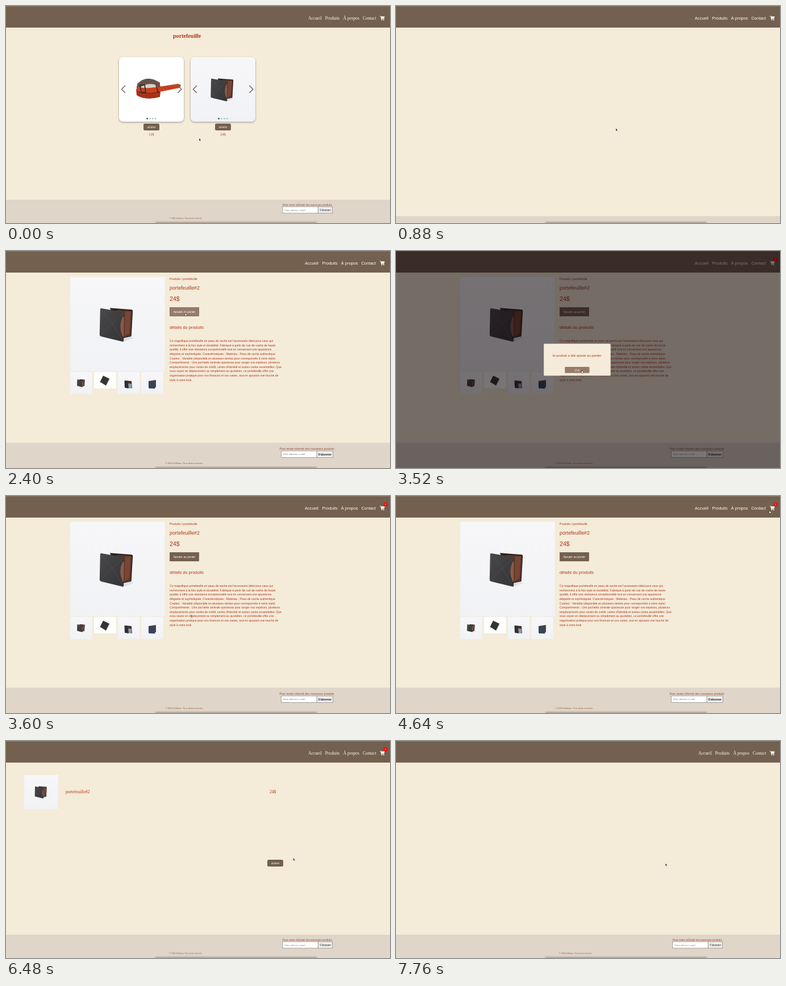
Recreate the animation shown at these times as an HTML page. Size 676 by 382 pixels, loop 8000 ms.

```html
<!DOCTYPE html>
<html lang="fr">
<head>
<meta charset="utf-8">
<title>Boutique</title>
<style>
html, body { margin: 0; width: 100%; height: 100%; overflow: hidden; background: #f4ebd9; }
svg { display: block; width: 676px; height: 382px; }
text { fill: #b0381b; white-space: pre; }
.serif { font-family: "Liberation Serif", "Times New Roman", serif; }
.sans { font-family: "Liberation Sans", Arial, sans-serif; }
</style>
</head>
<body>
<svg id="stage" viewBox="0 0 676 382" xmlns="http://www.w3.org/2000/svg">
  <defs>
    <filter id="soft" x="-20%" y="-20%" width="140%" height="150%"><feDropShadow dx="0" dy="1.2" stdDeviation="1.5" flood-opacity=".4"/></filter>
    <filter id="blur" x="-5%" y="-200%" width="110%" height="500%"><feGaussianBlur stdDeviation="1.8"/></filter>
    <linearGradient id="paper" x2="0" y2="1"><stop stop-color="#f7f7f9"/><stop offset="1" stop-color="#f1f2f5"/></linearGradient>
    <linearGradient id="leather" x2="1" y2="1"><stop stop-color="#48484b"/><stop offset="1" stop-color="#343436"/></linearGradient>
    <g id="wallet">
      <path d="M56 106 93 115 112 108 100 103Z" fill="#dfe0e4"/>
      <path d="M70 55 109 58Q111 59 110.500 61L108 105 94 108Z" fill="#2e2321"/>
      <path d="M82 58.500 109 60 106.500 104 93 107Z" fill="#5e3528"/>
      <path d="M97 61 107 61.500 104.500 99 96 105Z" fill="#774634"/>
      <path d="M54 55.500 92 62Q95.500 63 95.500 66L94.500 112Q94.500 115 91.500 114L54 105Q52 104 52 102L53 57Z" fill="url(#leather)"/>
      <path d="M55 58 74 82 92 66M55 102 74 82 91 109" fill="none" stroke="#56565a" stroke-width=".6"/>
      <path d="M92 72Q85 88 92 104L94.500 106 95 70Z" fill="#8a5a45"/>
    </g>
    <g id="belt">
      <ellipse cx="251" cy="144" rx="21" ry="16" fill="#4b3931"/>
      <ellipse cx="252" cy="143" rx="15" ry="9" fill="#d8d0ca"/>
      <path d="M231 137Q249 121 271 135L271 142Q250 131 233 146Z" fill="#65534a"/>
      <path d="M229 146Q240 156 272 150L271 160Q246 167 230 157Z" fill="#a83118"/>
      <path d="M230 141Q238 147 270 142L303 137 308 139 306 144 271 151Q241 156 230 150Z" fill="#c6421f"/>
      <path d="M230 150Q245 157 271 151" fill="none" stroke="#742110"/>
      <path d="M236 139h8l2 13h-8Z" fill="none" stroke="#3c302c" stroke-width="1.8"/>
      <path d="M264 138l4 15" stroke="#75200e" stroke-width="2"/>
      <path d="M279 144h17" stroke="#7a220f" stroke-width="1" stroke-dasharray="1 3"/>
    </g>
    <g id="basket">
      <path d="M0 .9h1.7l1.2 5.2h4.8" fill="none" stroke="currentColor" stroke-width=".9"/>
      <path d="M1.9 1.3h6.7l-1 3.9H2.7Z" fill="currentColor"/>
      <circle cx="3.5" cy="7.4" r=".9" fill="currentColor"/><circle cx="7" cy="7.4" r=".9" fill="currentColor"/>
    </g>
  </defs>
  <g id="page"></g>
  <g id="cart" transform="translate(658 17)"><use href="#basket"/></g>
  <g id="badge" class="sans"><circle cx="668" cy="14.6" r="3.6" fill="#f00d0d"/><text x="668" y="16.2" font-size="4.4" text-anchor="middle" style="fill:#fff">1</text></g>
  <rect x="263" y="380.5" width="284" height="5" fill="#5d5047" opacity=".5" filter="url(#blur)"/>
  <g id="status" class="sans"><rect x="-2" y="375.5" width="33.5" height="9" rx="1" fill="#dfe8cd" stroke="#9aa58d" stroke-width=".6"/><text x="0" y="380.6" font-size="4.3" style="fill:#222">ici/panier.html</text></g>
  <g id="dialog" class="sans">
    <rect width="676" height="382" fill="#0c0408" opacity=".55"/>
    <rect x="260.2" y="163.2" width="117.6" height="56.4" rx="1.5" fill="#f5ebda"/>
    <text x="318.7" y="186" font-size="6.1" text-anchor="middle">le produit a été ajouté au panier</text>
    <rect id="ok" x="297.3" y="204" width="43.2" height="10.7" rx="1"/>
    <text x="319.3" y="211.6" font-size="6" letter-spacing=".6" text-anchor="middle" style="fill:#f4ebd9">OK</text>
  </g>
  <g id="pointer">
    <path id="arrow" d="M0 0v4.4l1.1-1 .8 1.7.8-.4-.8-1.6h1.5Z" fill="#111" stroke="#fff" stroke-width=".35"/>
    <path id="hand" d="M0 0q.9-.5 1 .4v1.7l2 .5q.5 1.5-.4 3H.5L-.9 3.3l.9.1Z" fill="#fff" stroke="#111" stroke-width=".55"/>
    <path id="beam" d="M-.8 0h1.6M0 0v4.6M-.8 4.6h1.6" stroke="#333" stroke-width=".5"/>
  </g>
</svg>
<script>
const DURATION = 8000, STEP = 80;
const BROWN = '#73604e', HOVER = '#967b68', CREAM = '#f4ebd9', INK = '#222';
const $ = id => document.getElementById(id);

const rect = (x, y, w, h, fill, more = '') => `<rect x="${x}" y="${y}" width="${w}" height="${h}" fill="${fill}" ${more}/>`;
const text = (x, y, size, str, color = '', more = '') =>
  `<text x="${x}" y="${y}" font-size="${size}" ${color && `style="fill:${color}"`} ${more}>${str}</text>`;
const MIDDLE = 'text-anchor="middle"';
const BOLD = 'font-weight="700"';

function frame(family, content, footerY) {
  const serif = family === 'serif';
  const xs = serif ? [532, 561.8, 593.7, 628] : [526, 556.4, 589.8, 625.5];
  const nav = ['Accueil', 'Produits', 'À propos', 'Contact']
    .map((label, i) => text(xs[i], 23.8, serif ? 7.65 : 7.45, label, '#fffaf1')).join('');
  return `<g class="${family}">${rect(0, 0, 676, 382, CREAM)}${rect(0, 0, 676, 38, BROWN)}${rect(0, 0, 676, 1, '#887868')}${nav}
    ${rect(0, footerY, 676, 382 - footerY, '#dfd5c9')}${content}</g>`;
}

function footer(family) {
  const serif = family === 'serif';
  const x = serif ? 487 : 484.7, y = serif ? 353.2 : 352;
  const button = serif ? 25.2 : 28.2;
  return text(serif ? 487 : 481.5, y - 1.7, 5.1, 'Pour rester informé des nouveaux produits', '#9b4a2a')
    + rect(x, y, 62.5, 11.6, '#fff', 'stroke="#77736f" stroke-width=".6"')
    + text(x + 3, y + 7.3, serif ? 4.5 : 4.2, 'Votre adresse e-mail', '#777')
    + rect(x + 62.5, y, button, 11.6, '#efefef', 'stroke="#77736f" stroke-width=".6"')
    + text(x + 62.5 + button / 2, y + 7.6, serif ? 5.1 : 4.9, "S'abonner", INK, `${MIDDLE} ${serif ? '' : BOLD}`)
    + text(serif ? 287 : 280.5, 375, serif ? 3.75 : 3.9, '© 2024 Sellarine. Tous droits réservés.', '#94583c');
}

const photo = (x, y, size) =>
  rect(x, y, size, size, 'url(#paper)') + `<use href="#wallet" transform="translate(${x} ${y}) scale(${size / 167})"/>`;

const buy = (cx, y, hot) =>
  rect(cx - 14, y, 28, 12, hot ? HOVER : BROWN, 'rx="2.5"') + text(cx, y + 7.6, 5.1, 'acheter', '#fff', MIDDLE);

function card(x, picture, fill, price, hot) {
  const chevron = (cx, d) => `<path d="M${cx} 140l${6.5 * d} 6.5 ${-6.5 * d} 6.5" fill="none" stroke="${BROWN}" stroke-width="1.4"/>`;
  const dots = [0, 1, 2, 3].map(i => `<circle cx="${x + 49.6 + i * 4.9}" cy="198.3" r="1.45" fill="${i ? '#b4c4d3' : '#2b6390'}"/>`).join('');
  return rect(x, 90, 114, 113.5, fill, 'rx="7" filter="url(#soft)"') + picture
    + chevron(x + 11, -1) + chevron(x + 103.3, 1) + dots + buy(x + 57, 207, hot)
    + text(x + 57, 227.8, 6.2, price, '', MIDDLE);
}

function listPage(hot) {
  const wallet = '<use href="#wallet" transform="translate(325 90) scale(.68)"/>';
  return frame('serif', text(294, 55.5, 10.1, 'portefeuille', '', BOLD)
    + card(199, '<use href="#belt"/>', '#fff', '12$', false)
    + card(325, wallet, 'url(#paper)', '24$', hot) + footer('serif'), 341);
}

const DETAILS = [
  "Ce magnifique portefeuille en peau de vache est l'accessoire idéal pour ceux qui",
  'recherchent à la fois style et durabilité. Fabriqué à partir de cuir de vache de haute',
  'qualité, il offre une résistance exceptionnelle tout en conservant une apparence',
  'élégante et sophistiquée. Caractéristiques : Matériau : Peau de vache authentique',
  'Couleur : Variable (disponible en plusieurs teintes pour correspondre à votre style)',
  'Compartiments : Une pochette centrale spacieuse pour ranger vos espèces, plusieurs',
  "emplacements pour cartes de crédit, cartes d'identité et autres cartes essentielles. Que",
  'vous soyez en déplacement ou simplement au quotidien, ce portefeuille offre une',
  'organisation pratique pour vos finances et vos cartes, tout en ajoutant une touche de',
  'style à votre look.'
];

function productPage(hot) {
  const thumbs = photo(113, 213, 38.8)
    + rect(155, 213, 38.8, 29, '#fdfdfc')
    + '<path d="M171 219.5l11 5.3-6 12-10.5-6.3Z" fill="#343437"/><path d="M166.5 230.5l9.5 6.3 6-12" fill="none" stroke="#6b6b6e" stroke-width=".6"/>'
    + rect(196.8, 213, 38.5, 38.5, 'url(#paper)')
    + '<path d="M209 228l12 1 1 12.5-12.5-.8Z" fill="#4a3029"/><path d="M208.5 228l7 1v13l-6.5-1.6Z" fill="#303034"/><path d="M215 233l6 1v7.5l-5-.2Z" fill="#8c9aa6"/>'
    + rect(238.2, 213, 38.5, 38.5, 'url(#paper)')
    + '<path d="M251 229l13-2v13l-12 2.3Z" fill="#56413a"/><path d="M251 229l11 1.2v12.2l-11-1.3Z" fill="#34445b"/>';
  return frame('sans', photo(113, 45.5, 166.5) + thumbs
    + text(288, 51, 5.2, 'Produits / portefeuille') + text(288, 68, 8.8, 'portefeuille#2')
    + text(288, 87.6, 10.6, '24$')
    + rect(288.3, 99.3, 51.4, 15.4, hot ? HOVER : BROWN, 'stroke="#5f4f40" stroke-width=".5"')
    + text(314, 109, 5.1, 'Ajouter au panier', '#fff', MIDDLE)
    + text(288, 137.4, 7.4, 'détails du produits')
    + DETAILS.map((line, i) => text(288, 160.2 + i * 7.59, 5.12, line)).join('') + footer('sans'), 337.5);
}

function cartPage(filled) {
  const row = photo(32, 60, 60) + text(105, 92, 7.6, 'portefeuille#2') + text(464, 92, 7.6, '24$') + buy(474, 209, false);
  return frame('serif', (filled ? row : '') + footer('serif'), 341);
}

const PAGES = {
  list: listPage(false), listHot: listPage(true), loading: frame('sans', '', 370),
  product: productPage(false), productHot: productPage(true),
  cartEmpty: cartPage(false), cartFull: cartPage(true)
};

// Each entry holds from its time until the next one.
const SCENES = [[0, 'list'], [400, 'listHot'], [880, 'loading'], [1040, 'product'], [2000, 'productHot'],
  [2720, 'product'], [4960, 'cartEmpty'], [5440, 'cartFull'], [7440, 'cartEmpty']];
const SHAPES = [[0, 'arrow'], [400, 'hand'], [720, 'arrow'], [2000, 'hand'], [2720, 'arrow'], [3200, 'hand'],
  [3600, 'beam'], [4000, 'arrow'], [4640, 'hand'], [5280, 'arrow'], [6960, 'hand'], [7440, 'arrow']];
const PATH = [[0, 340, 233], [400, 387, 215.5], [1360, 387, 215.5], [2000, 315, 108.5], [2720, 315, 108.5],
  [3280, 326.5, 209.5], [3840, 326.5, 209.5], [4720, 665, 20.5], [5200, 665, 20.5], [5600, 408, 156],
  [5760, 408, 156], [6640, 515, 211], [7040, 474.3, 215.5], [DURATION, 474.3, 215.5]];

const current = (list, t) => list.filter(([start]) => start <= t).pop()[1];
const show = (id, on) => $(id).setAttribute('display', on ? 'inline' : 'none');
const between = (t, a, b) => t >= a && t < b;

function position(t) {
  const i = PATH.findIndex(([end]) => end > t);
  const [t0, x0, y0] = PATH[i - 1], [t1, x1, y1] = PATH[i];
  const p = (t - t0) / (t1 - t0), e = p * p * (3 - 2 * p);
  return [x0 + (x1 - x0) * e, y0 + (y1 - y0) * e];
}

let shown;
function draw(t) {
  const scene = current(SCENES, t), shape = current(SHAPES, t);
  if (scene !== shown) $('page').innerHTML = PAGES[shown = scene];
  show('dialog', between(t, 2720, 3600));
  show('badge', between(t, 2720, 4960) || between(t, 5440, 7440));
  show('status', between(t, 4800, 5440));
  $('cart').setAttribute('color', between(t, 4720, 5280) ? '#b99a7f' : '#fffaf1');
  $('ok').setAttribute('fill', between(t, 3200, 3600) ? HOVER : BROWN);
  for (const id of ['arrow', 'hand', 'beam']) show(id, id === shape);
  $('pointer').setAttribute('transform', `translate(${position(t)})`);
}

function tick() {
  draw(Math.floor((performance.now() % DURATION) / STEP) * STEP);
  requestAnimationFrame(tick);
}
tick();
</script>
</body>
</html>
```
